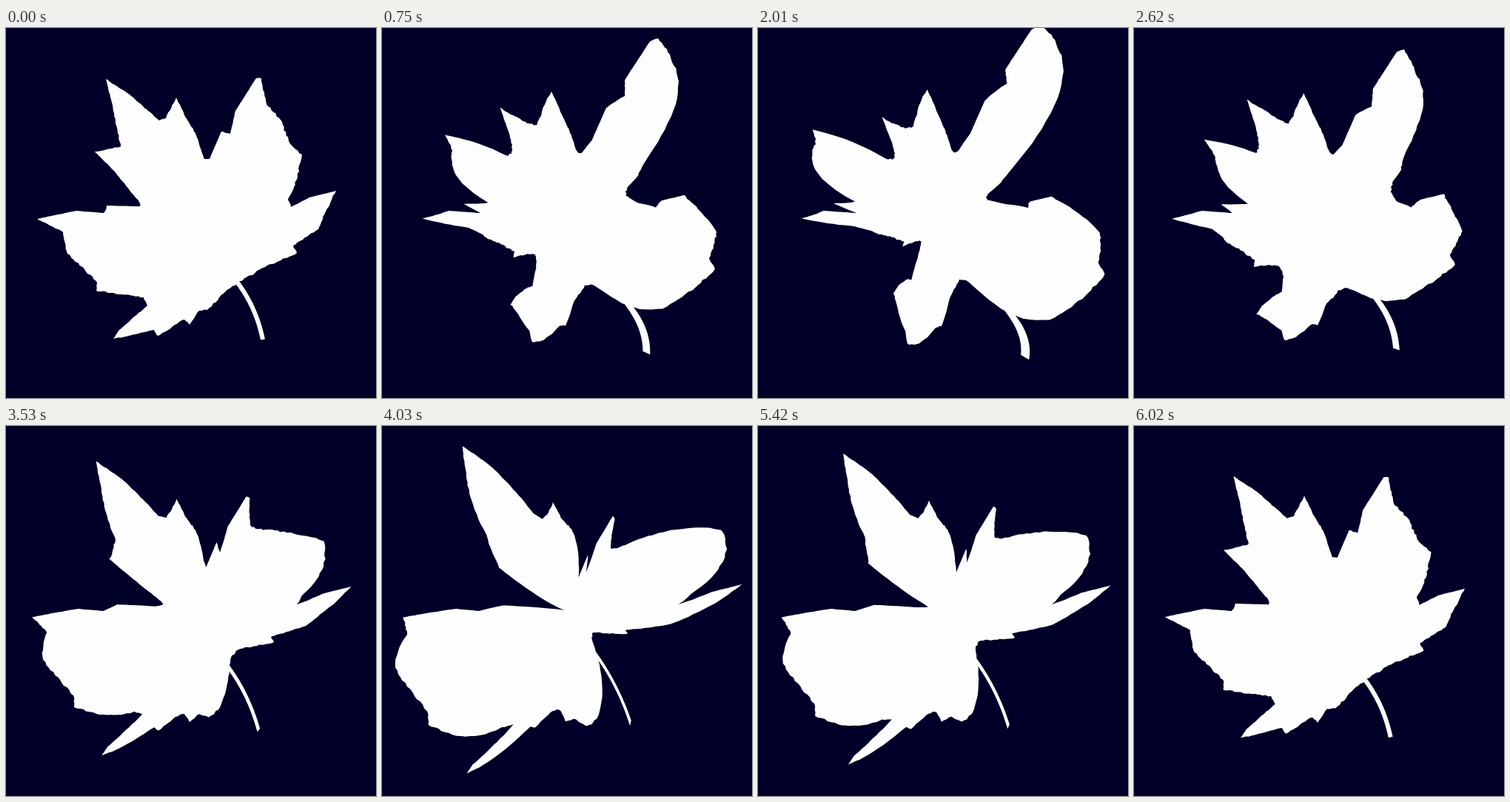
These frames come from a looping animation (500x500 px, 6040 ms). An HTML page with a canvas:

```html
<!DOCTYPE html>
<html lang="en">
<head>
<meta charset="utf-8">
<title>Leaf</title>
<style>
html, body { margin: 0; width: 100%; height: 100%; overflow: hidden; background: #000028; }
canvas { display: block; }
</style>
</head>
<body>
<canvas id="stage" width="500" height="500"></canvas>
<script>
const ctx = document.getElementById('stage').getContext('2d');
const { sin, cos, hypot, atan2, max, ceil, PI } = Math;
const LOOP = 6040, LAG = 58, CENTER = 250, STEP = 4;

// Key corners of the blade, clockwise from the upper left tip
const corners = [
  [135, 69], [167, 90], [207, 125], [216, 122], [230, 94], [243, 121], [256, 142], [268, 177],
  [275, 177], [291, 140], [303, 143], [310, 112], [338, 68], [345, 68], [352, 103], [371, 124],
  [383, 155], [400, 171], [393, 205], [381, 232], [385, 242], [410, 229], [446, 220], [432, 248],
  [422, 272], [388, 294], [393, 304], [350, 323], [312, 345], [300, 353], [272, 381], [261, 382],
  [248, 401], [241, 394], [205, 416], [200, 408], [145, 420], [153, 408], [191, 375], [186, 364],
  [157, 360], [122, 355], [122, 342], [83, 305], [77, 276], [42, 258], [95, 247], [132, 250],
  [136, 240], [181, 241], [180, 235], [148, 195], [120, 167], [155, 160], [142, 97]
];

let seed = 7;
function random() {
  seed = seed * 16807 % 2147483647;
  return seed / 2147483647;
}

// Radial swing in pixels as a sum of waves around the center
const swing = a =>
  27 * cos(a) - 36 * cos(3 * a) - 11.6 * cos(5 * a) + 27 * cos(7 * a) - 5 * cos(9 * a)
  - 10.6 * sin(a) + 41 * sin(2 * a) + 56 * sin(4 * a)
  + 3.9 * sin(5 * a) + 13.5 * sin(6 * a) - 6 * sin(7 * a);

function polar([x, y], jag = 0) {
  const dx = x - CENTER, dy = y - CENTER, a = atan2(dy, dx);
  return { c: cos(a), s: sin(a), r: hypot(dx, dy) + jag * (random() - 0.5), f: swing(a) };
}

// Straight edges between the corners, split finely and slightly ragged
const blade = corners.flatMap(([x, y], i) => {
  const [nx, ny] = corners[(i + 1) % corners.length];
  const count = ceil(hypot(nx - x, ny - y) / STEP);
  return Array.from({ length: count }, (_, k) =>
    polar([x + (nx - x) * k / count, y + (ny - y) * k / count], k ? 2.4 : 0));
});

// One side of the curved stem
function stemSide(offset) {
  return Array.from({ length: 25 }, (_, i) => {
    const t = i / 24, u = 1 - t;
    const x = 312 * u * u + 676 * u * t + 347 * t * t, y = 343 * u * u + 754 * u * t + 421 * t * t;
    const dx = 26 * u + 9 * t, dy = 34 * u + 44 * t, d = offset / hypot(dx, dy);
    return polar([x + dy * d, y - dx * d]);
  });
}
const stem = [...stemSide(3), ...stemSide(-3).reverse()];

const wave = t => sin(2 * PI * (t - LAG) / LOOP);

function draw(t) {
  const amount = wave(t) - wave(0);
  ctx.fillStyle = '#000028';
  ctx.fillRect(0, 0, 500, 500);
  ctx.fillStyle = '#fdfdfd';
  for (const shape of [blade, stem]) {
    ctx.beginPath();
    for (const { c, s, r, f } of shape) {
      const reach = max(0, r + f * amount);
      ctx.lineTo(CENTER + reach * c, CENTER + reach * s);
    }
    ctx.fill();
  }
}

const start = performance.now();
function tick() {
  draw((performance.now() - start) % LOOP);
  requestAnimationFrame(tick);
}
tick();
</script>
</body>
</html>
```
